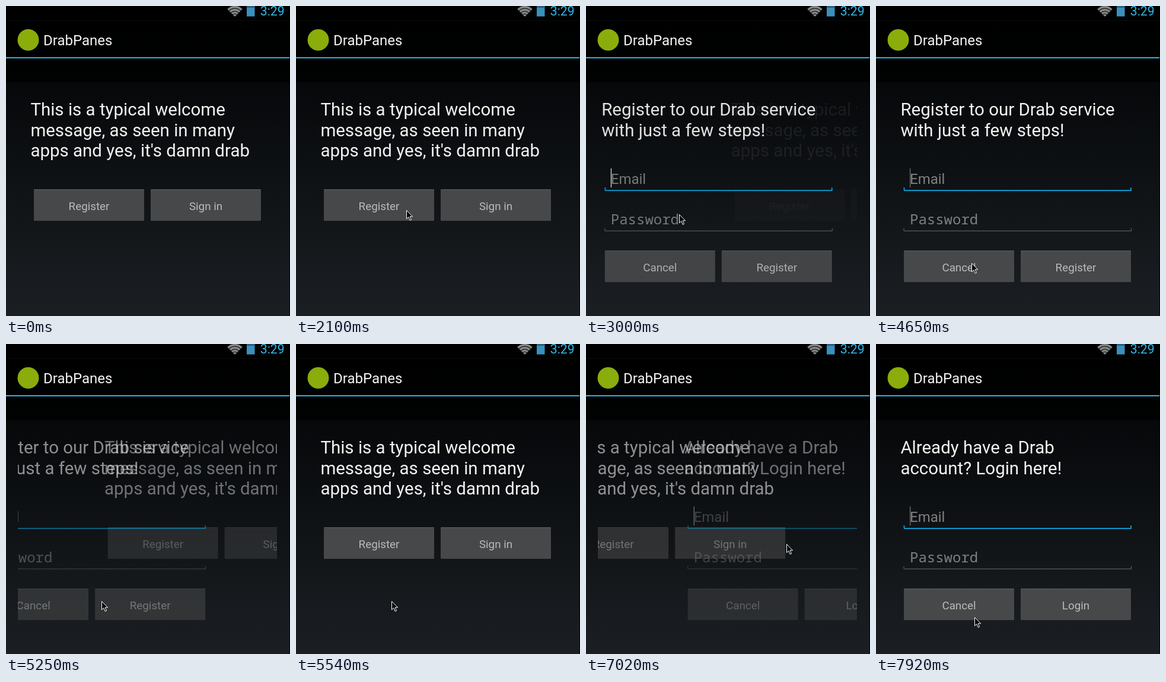
Write an HTML page that moves like this. It is 479 px wide and 521 px high and loops after 8000 ms.

```html
<!DOCTYPE html>
<html lang="en">
<head>
<meta charset="utf-8">
<title>Welcome form</title>
<style>
  html, body { margin: 0; width: 100%; height: 100%; overflow: hidden; background: #000; }
  svg { display: block; width: 479px; height: 521px; }
  text { font-family: Roboto, "Noto Sans", sans-serif; white-space: pre; }
  .title { font-size: 24px; fill: #f3f3f3; }
  .clock { font-size: 21.33px; fill: #33b5e5; }
  .heading { font-size: 29.48px; fill: #f3f3f3; }
  .hint { font-size: 24px; fill: #7e8081; }
  .mono { font-family: "Noto Sans Mono", "DejaVu Sans Mono", monospace; }
  .label { font-size: 18.8px; fill: #b9baba; text-anchor: middle; }
</style>
</head>
<body>
<svg viewBox="0 0 479 521">
  <defs>
    <linearGradient id="shade" x1="0" y1="0" x2="0" y2="1">
      <stop offset="0" stop-color="#000"/>
      <stop offset=".245" stop-color="#010202"/>
      <stop offset=".245" stop-color="#06080a"/>
      <stop offset="1" stop-color="#1b1f23"/>
    </linearGradient>
    <clipPath id="frame"><rect x="20" y="88" width="437" height="433"/></clipPath>
  </defs>
  <rect width="479" height="521" fill="#000"/>
  <rect width="478" height="521" fill="url(#shade)"/>
  <rect y="24" width="478" height="1" fill="#0b0c0d"/>
  <rect y="86" width="478" height="2" fill="#33b0e0"/>

  <g id="wifi" fill="none" stroke="#858686" stroke-width="3.6"></g>
  <rect x="406" y="0" width="13.5" height="17.5" fill="#3a90bd"/>
  <rect x="406" y="0" width="13.5" height="3" fill="#265f7c"/>
  <text class="clock" x="428.7" y="16">3:29</text>

  <circle cx="37.5" cy="57" r="18" fill="#8aad0c"/>
  <text class="title" x="63" y="66">DrabPanes</text>

  <g id="pages" clip-path="url(#frame)"></g>
  <path id="pointer" d="M.5.5V14.7L3.8 11.6 6.2 17.3 8.5 16.3 6.1 10.8H10.6Z"
        fill="#000" stroke="#fff"/>
</svg>
<script>
const LOOP = 8000;
const SHIFT = 218.5;      // half the container width
const SLIDE_MS = 400;
const FIRST_MS = 32;      // slide age at its first visible step

const $ = id => document.getElementById(id);
const rect = (x, y, w, h, fill, more = '') =>
  `<rect x="${x}" y="${y}" width="${w}" height="${h}" fill="${fill}" ${more}/>`;
const text = (cls, x, y, str) => `<text class="${cls}" x="${x}" y="${y}">${str}</text>`;

const heading = lines =>
  lines.map((line, i) => text('heading', 41.4, 184 + i * 34.5, line)).join('');

function button(x, y, label, pressId) {
  const pressed = pressId
    ? `<g id="${pressId}">${rect(x - 5, y - 5, 196, 63, '#1e566f', 'rx="4"')}` +
      `${rect(x, y, 186, 53, '#2fa0d1', 'rx="1"')}</g>`
    : '';
  return rect(x, y, 186, 53, '#474849', 'rx="1"') +
    rect(x + .5, y, 185, 1, '#5e5f60') +
    pressed + text('label', x + 93, y + 34.5, label);
}

function underline(y, h, color) {
  return rect(47, y, 384, h, color) +
    rect(46.5, y - 4, h, 4, color) + rect(431 - h, y - 4, h, 4, color);
}

const form = (lines, action, pressId) =>
  heading(lines) +
  text('hint', 57, 298.5, 'Email') + underline(309, 2, '#0c95c9') +
  rect(57, 273, 1.3, 32, '#fff', 'class="caret"') +
  text('hint mono', 57, 367, 'Password') + underline(377.5, 1, '#6d6f70') +
  button(47, 411, 'Cancel', pressId) + button(244, 411, action);

const content = {
  welcome: heading(['This is a typical welcome', 'message, as seen in many',
    "apps and yes, it's damn drab"]) +
    button(47, 308, 'Register', 'pressRegister') + button(244, 308, 'Sign in', 'pressSign'),
  register: form(['Register to our Drab service', 'with just a few steps!'],
    'Register', 'pressCancel'),
  login: form(['Already have a Drab', 'account? Login here!'], 'Login')
};

$('pages').innerHTML = Object.entries(content)
  .map(([name, body]) => `<g id="${name}">${body}</g>`).join('');
$('wifi').innerHTML = [2.5, 7, 11.6, 16.2].map(r => {
  const d = r * .71;
  return `<path d="M${386 - d} ${18 - d}A${r} ${r} 0 0 1 ${386 + d} ${18 - d}"/>`;
}).join('');

// dir 1 slides to the right, -1 to the left
const slides = [
  { at: 2700, span: 450, from: 'welcome', to: 'register', dir: 1, press: 'pressRegister' },
  { at: 5100, span: 440, from: 'register', to: 'welcome', dir: -1, press: 'pressCancel' },
  { at: 6730, span: 440, from: 'welcome', to: 'login', dir: -1, press: 'pressSign' }
];

// time, x, y: the pointer holds each place until the next
const moves = [
  [150, 396, 471], [300, 379, 420], [450, 358, 362], [600, 350, 339],
  [2100, 186, 343], [2250, 157, 350],
  [3750, 232, 405], [3900, 265, 431],
  [4200, 245, 432], [4350, 208, 432], [4500, 177, 432], [4650, 161, 432],
  [5690, 252, 403], [5840, 315, 380],
  [6140, 333, 346], [6290, 338, 336],
  [7770, 240, 412], [7920, 166, 459]
];

const dimCaret = [[3750, 4200], [4650, 5100], [7770, LOOP]];

const ease = p => .5 - Math.cos(Math.PI * Math.min(p, 1)) / 2;
const show = (el, on) => { el.style.display = on ? '' : 'none'; };

function place(name, x, alpha) {
  const page = $(name);
  show(page, alpha > 0);
  page.setAttribute('transform', `translate(${x} 0)`);
  page.setAttribute('opacity', alpha);
}

function draw(t) {
  const slide = slides.findLast(s => t >= s.at);
  const step = slide ? Math.floor((t - slide.at) / (slide.span / 3)) : 0;

  for (const name in content) place(name, 0, 0);
  if (slide) {
    const p = step > 2 ? 1 : ease((FIRST_MS + step * 150) / SLIDE_MS);
    place(slide.from, slide.dir * SHIFT * p, 1 - p);
    place(slide.to, -slide.dir * SHIFT * (1 - p), p);
  } else {
    place('welcome', 0, 1);
  }
  for (const s of slides) show($(s.press), s === slide && step === 0);

  const dim = dimCaret.some(([a, b]) => t >= a && t < b);
  for (const caret of document.querySelectorAll('.caret'))
    caret.setAttribute('fill', dim ? '#6f7172' : '#e8e8e8');

  const move = moves.findLast(m => t >= m[0]);
  show($('pointer'), move);
  if (move) $('pointer').setAttribute('transform', `translate(${move[1]} ${move[2]})`);
}

function tick() {
  draw(performance.now() % LOOP);
  requestAnimationFrame(tick);
}
tick();
</script>
</body>
</html>
```
